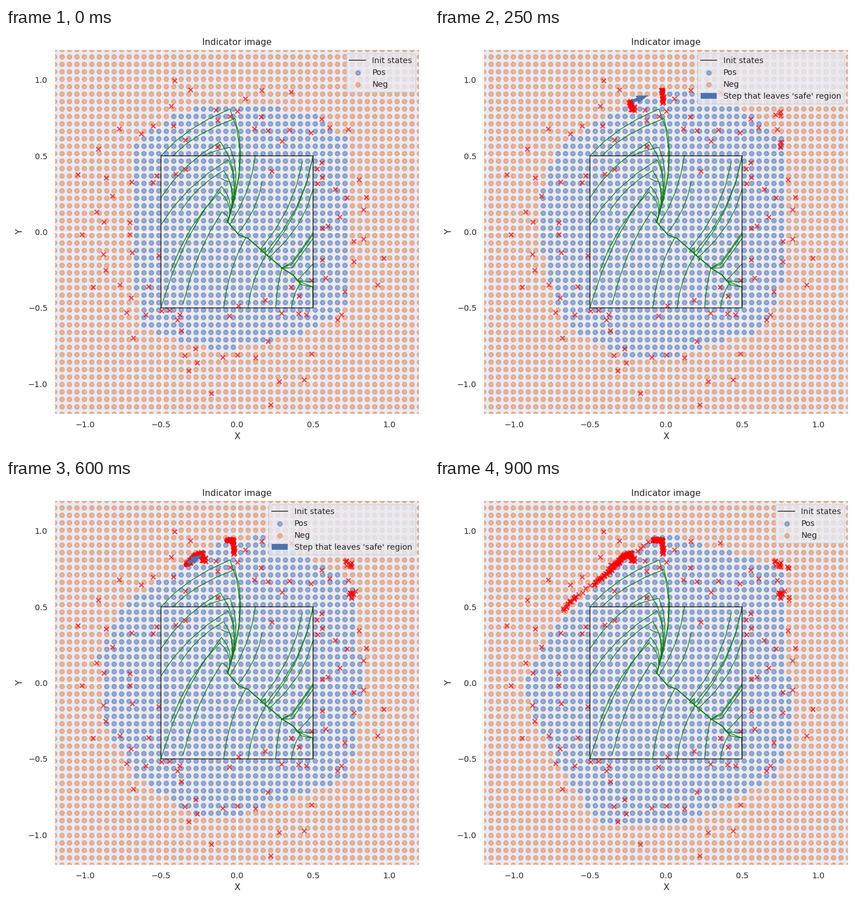
Recreate the animation shown at these times as a matplotlib script. Size 748 by 748 pixels, loop 950 ms.

```python
import numpy as np
import matplotlib.pyplot as plt
from matplotlib.animation import FuncAnimation
from matplotlib.colors import to_rgba
from matplotlib.path import Path

SIZE, FRAMES, STEP = 748, 19, 50
CX, CY, UNIT = 408.55, 360.5, 268.8
BLUE, ORANGE, INK = "#4C72B0", "#DD8452", "0.15"
PAIR = np.array([to_rgba(ORANGE, 0.5), to_rgba(BLUE, 0.5)])

plt.rcParams.update({
    "font.family": "DejaVu Sans", "font.size": 12, "text.color": INK,
    "axes.facecolor": "#EAEAF2", "axes.edgecolor": "white", "axes.linewidth": 1.25,
    "axes.axisbelow": True, "grid.color": "white", "grid.linewidth": 1,
    "xtick.color": INK, "ytick.color": INK,
})
rng = np.random.default_rng(4)


def to_data(points):
    """Stage pixels to axis units."""
    return (np.asarray(points, float) - (CX, CY)) * (1, -1) / UNIT


def along(keys, points, t):
    """Position on a timed path."""
    return np.column_stack([np.interp(t, keys, axis) for axis in zip(*points)])


# Outline of the safe region, clockwise from the left
FIRST = [(224, 300), (224, 205), (304, 150), (362, 136), (442, 136), (540, 150),
         (606, 200), (606, 490), (540, 535), (389, 570), (370, 570), (237, 530), (226, 425)]
WIDEST = [(164, 310), (208, 222), (312, 152), (370, 112), (460, 100), (560, 150),
          (618, 190), (631, 390), (606, 530), (410, 594), (330, 594), (232, 530), (176, 435)]
LAST = [(158, 367), (208, 265), (320, 152), (385, 102), (425, 101), (560, 140),
        (618, 160), (631, 470), (606, 525), (445, 608), (290, 608), (235, 530), (183, 440)]
TURN = 12


def region(n):
    """Grows quickly at first, then drifts away from the upper left."""
    grow = min(n / TURN, 1) ** 0.5
    drift = max(n - TURN, 0) / (FRAMES - 1 - TURN)
    first, widest, last = map(to_data, (FIRST, WIDEST, LAST))
    return Path(first + grow * (widest - first) + drift * (last - widest))


def ring(count):
    """Samples known from the start, spread around the safe region."""
    angle = 2 * np.pi * (np.arange(count) + rng.uniform(-0.8, 0.8, count)) / count
    radius = UNIT * rng.triangular(0.42, 0.7, 1.18, count)
    return np.column_stack([np.zeros(count), CX + radius * np.cos(angle),
                            CY - radius * np.sin(angle)])


def trail(keys, points, count, spread):
    """Samples that pile up along a path as time goes on."""
    born = np.linspace(keys[0], keys[-1], count)
    xy = along(keys, points, born) + rng.normal(0, spread, (count, 2))
    return np.column_stack([born, xy])


samples = np.vstack([
    ring(100),
    trail([1, 2, 4, 7, 12, 15],
          [(352, 144), (348, 142), (345, 131), (336, 134), (319, 151), (308, 163)], 110, 1.8),
    trail([1, 4, 7, 12, 16],
          [(404, 132), (402, 113), (400, 107), (391, 108), (386, 108)], 80, 1.1),
    trail([2, 11], [(609, 149), (606, 147)], 10, 3.5),
    trail([2, 11], [(614, 202), (610, 201)], 11, 3.5),
    trail([14, 15], [(378, 111), (357, 128)], 4, 1),
    trail([15, 16], [(297, 171), (240, 216)], 9, 1),
    trail([16.5, 18], [(308, 163), (280, 187)], 22, 1.3),
    trail([16.5, 18], [(250, 207), (225, 231)], 15, 1.2),
    trail([17.5, 18], [(624, 156), (624, 159)], 3, 1),
    trail([17.5, 18], [(627, 209), (627, 214)], 2, 1),
])
born, cross_xy = samples[:, 0], to_data(samples[:, 1:])


def bezier(a, control, b, count=5):
    t = np.linspace(0, 1, count)[:, None]
    a, control, b = map(np.array, (a, control, b))
    return (1 - t) ** 2 * a + 2 * t * (1 - t) * control + t ** 2 * b


def bend(a, b, kx, ky):
    """Curve whose control point lies at the given shares of the way."""
    return bezier(a, (a[0] + kx * (b[0] - a[0]), a[1] + ky * (b[1] - a[1])), b)


HUB = (392, 344)
# Start and crest of the paths that fall into the hub
CRESTS = [
    ((274, 226), (396, 143)), ((297, 224), (405, 160)), ((350, 226), (396, 211)),
    ((274, 300), (379, 201)), ((274, 348), (393, 233)), ((310, 322), (385, 252)),
    ((380, 266), (396, 272)), ((274, 494), (381, 280)), ((291, 430), (378, 290)),
    ((313, 488), (382, 325)),
]
# Common route, and paths that join it: start and the x where they meet
ROUTE = [(390, 340), (397, 349), (412, 366), (428, 372), (462, 402), (489, 425),
         (508, 437), (522, 454)]
STEEP = [
    (441, 226, 396), (453, 272, 410), (524, 237, 450), (543, 226, 462), (543, 228, 458),
    (543, 285, 466), (385, 494, 424), (428, 494, 460), (477, 494, 488), (505, 494, 520),
]


def paths():
    for start, crest in CRESTS:
        drop = HUB[1] - crest[1]
        fall = bezier(crest, (393 + 0.2 * drop, crest[1] + 0.4 * drop), HUB, 6)
        yield np.vstack([bend(start, crest, 0.35, 0.6), fall])
    for x, y, meet in STEEP:
        yield bend((x, y), (meet, np.interp(meet, *zip(*ROUTE))), 0.2, 0.55)
    for y in (362, 365, 372):
        yield [(543, y), (506, y + 52), (487, 425)]
    for y in (417, 449, 458):
        yield [(543, y), (515, 447), (508, 437)]
    yield [(450, 396), (459, 388), (458, 400), (468, 407), (466, 412)]
    yield [(543, 494), (542, 458), (522, 454)]


# Steps that leave the region: usually upper left, sometimes far right
STEP_KEYS = [1, 5, 7, 12, 14, 16]
STEP_FROM = [(350, 143), (345, 131), (335, 135), (318, 151), (290, 178), (234, 227)]
STEP_TO = [(404, 130), (402, 110), (400, 107), (390, 108), (357, 128), (298, 173)]


def leaving_step(n):
    if n in (2, 3, 4, 17):
        a = along([2, 4, 17], [(610, 152), (615, 139), (624, 158)], n)
        b = a + (5, 53)
    else:
        a, b = along(STEP_KEYS, STEP_FROM, n), along(STEP_KEYS, STEP_TO, n)
    return to_data(a)[0], to_data(b)[0]


fig = plt.figure(figsize=(8, 8), dpi=SIZE / 8, facecolor="white")
side = 2.4 * UNIT / SIZE
ax = fig.add_axes([CX / SIZE - side / 2, 1 - CY / SIZE - side / 2, side, side])
ticks = np.linspace(-1, 1, 5)
ax.set(xlim=(-1.2, 1.2), ylim=(-1.2, 1.2), xticks=ticks, yticks=ticks)
ax.tick_params(length=0, pad=9.5, labelsize=11)
ax.grid(True)
ax.set_title("Indicator image", fontsize=12)
fig.text(CX / SIZE, 1 - 727 / SIZE, "X", ha="center", va="baseline")
fig.text(29 / SIZE, 1 - CY / SIZE, "Y", rotation=90, rotation_mode="anchor",
         ha="center", va="baseline")

axis = np.linspace(-1.2, 1.2, 50)
grid = np.stack(np.meshgrid(axis, axis), -1).reshape(-1, 2)
dots = ax.scatter(*grid.T, s=36, linewidths=1.5)
keys = [ax.scatter([], [], s=36, color=color, alpha=0.5, linewidths=1.5, label=label)
        for color, label in ((BLUE, "Pos"), (ORANGE, "Neg"))]
crosses = ax.scatter([], [], s=36, marker="x", color="red", alpha=0.75, linewidths=1.5)

for path in paths():
    ax.plot(*to_data(path).T, color="green", lw=0.9)
ax.plot(*to_data(ROUTE).T, color="green", lw=1.4)
box, = ax.plot([-0.5, 0.5, 0.5, -0.5, -0.5], [-0.5, -0.5, 0.5, 0.5, -0.5],
               color="black", alpha=0.8, lw=1.2, label="Init states")
arrow = ax.arrow(0, 0, 0.05, 0, width=0.02, head_width=0.05, head_length=0.075,
                 fc=BLUE, ec=BLUE, lw=0.3, label="Step that leaves 'safe' region")
ends, = ax.plot([], [], "ro", ms=6)


def add_legend(handles):
    legend = ax.legend(handles=handles, loc="upper right", fontsize=11,
                       framealpha=0.8, edgecolor="0.8")
    ax.legend_ = None
    ax.add_artist(legend)
    return legend


short_legend = add_legend([box, *keys])
long_legend = add_legend([box, *keys, arrow])


def update(n):
    dots.set_color(PAIR[region(n).contains_points(grid).astype(int)])
    crosses.set_offsets(cross_xy[born <= n])
    moving = 0 < n < FRAMES - 1
    for part in (arrow, ends, long_legend):
        part.set_visible(moving)
    short_legend.set_visible(not moving)
    if moving:
        a, b = leaving_step(n)
        dx, dy = 0.05 * (b - a) / np.hypot(*(b - a))
        arrow.set_data(x=a[0], y=a[1], dx=dx, dy=dy)
        ends.set_data(*zip(a, b))
    return dots, crosses, arrow, ends


anim = FuncAnimation(fig, update, frames=FRAMES, interval=STEP, repeat=True,
                     repeat_delay=0, blit=False)
plt.show()
```
